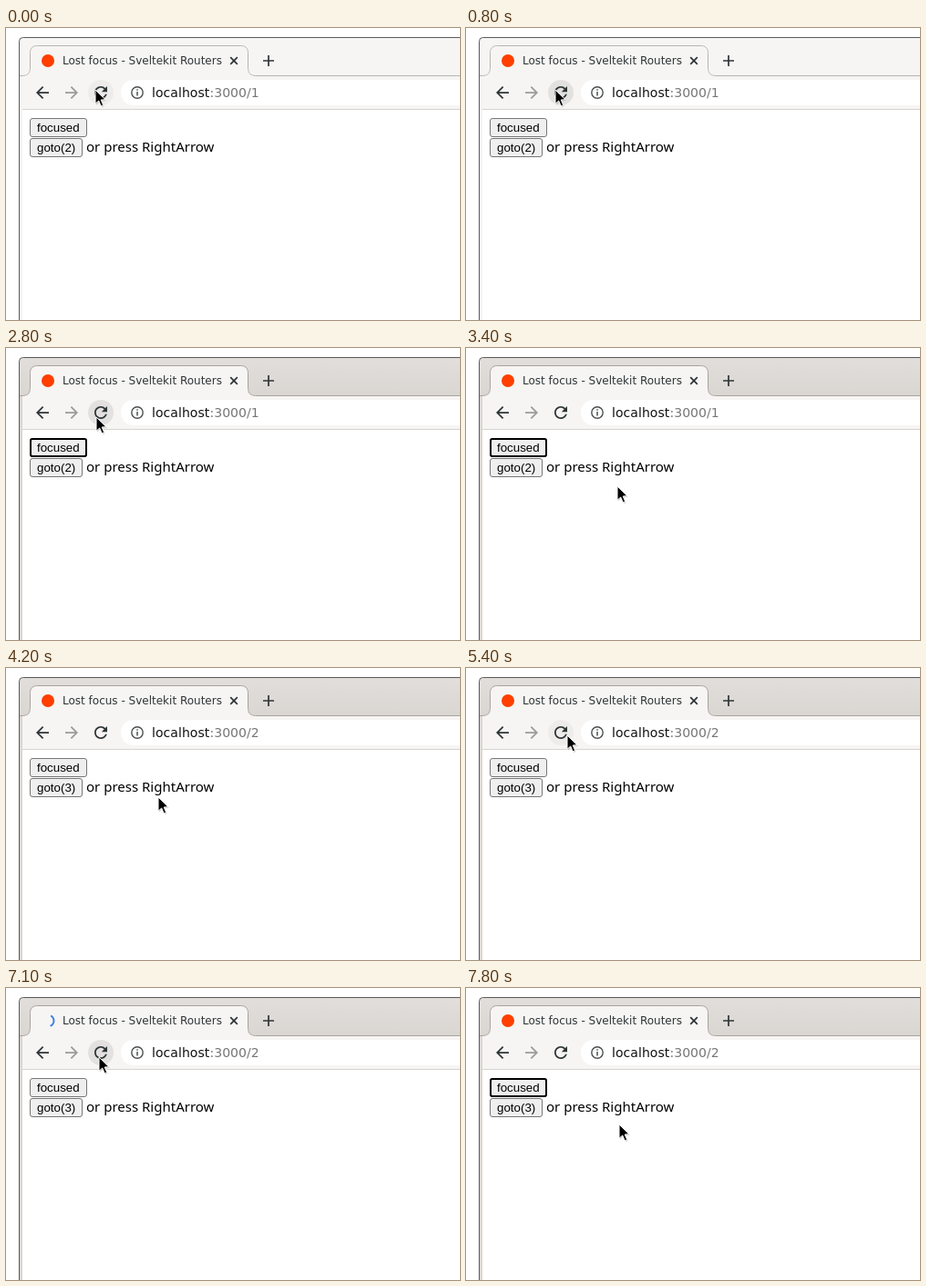
These frames come from a looping animation (498x321 px, 8 s). An HTML page:

```html
<!DOCTYPE html>
<html lang="en">
<head>
<meta charset="utf-8">
<title>Browser focus</title>
<style>
  html, body { margin: 0; width: 100%; height: 100%; overflow: hidden; background: #fff; }
  svg { display: block; width: 498px; height: 321px; }
  .ui { font: 12px "DejaVu Sans", sans-serif; fill: #2e3436; }
  .url { font-size: 14px; letter-spacing: .06px; fill: #111; }
  .dim { fill: #777; }
  .btn { font: 13.333px "Liberation Sans", Arial, sans-serif; }
  .body { font: 15px "Noto Sans", sans-serif; }
  .box { fill: #efefef; stroke: #767676; }
  .line { fill: none; stroke: #2e3436; stroke-width: 1.7; }
</style>
</head>
<body>
<svg viewBox="0 0 498 321">
  <defs>
    <linearGradient id="active" x1="0" y1="0" x2="0" y2="1">
      <stop offset="0" stop-color="#e1dedb"/>
      <stop offset="1" stop-color="#dad6d2"/>
    </linearGradient>
    <path id="arrow" d="M20 11H7.83l5.59-5.59L12 4l-8 8 8 8 1.41-1.41L7.83 13H20z"/>
  </defs>

  <!-- window frame -->
  <path id="strip" d="M15 50H18V321H15Z"/>
  <path id="bar" d="M15 52V14Q15 11 18 11H498V52Z"/>
  <path d="M14.5 321V14.5Q14.5 10.5 18.5 10.5H498" fill="none" stroke="#5a5a5a"/>
  <path d="M18 52H498V89H18Z" fill="#f6f5f4"/>
  <path d="M18 89H498V90H18Z" fill="#d8d4d0"/>
  <path d="M18 90H498V321H18Z" fill="#fff"/>
  <path id="tab" d="M15 52.5H18.5Q26.5 52.5 26.5 44.5V27.5Q26.5 19.5 34.5 19.5H257.5Q265.5 19.5 265.5 27.5V44.5Q265.5 52.5 273.5 52.5H498" fill="none"/>
  <path d="M20 53Q27 52 27 44.5V27.5Q27 20 34.5 20H257.5Q265 20 265 27.5V44.5Q265 52 272 53Z" fill="#f6f5f4"/>

  <!-- tab strip -->
  <circle id="icon" cx="46" cy="36" r="7" fill="#ff3e00"/>
  <circle id="spin" cx="46" cy="36" r="6.5" fill="none" stroke="#3b82e6" stroke-width="2" stroke-dasharray="14 27"/>
  <text class="ui" x="62" y="40">Lost focus - Sveltekit Routers</text>
  <path class="line" d="M246.2 32.2l7.6 7.6m0-7.6l-7.6 7.6"/>
  <path class="line" d="M282 36H294M288 30V42" stroke-width="2"/>

  <!-- toolbar -->
  <circle id="hover" cx="104" cy="71" r="14"/>
  <use href="#arrow" transform="translate(29.5 60.5) scale(.875)" fill="#2e3436"/>
  <use href="#arrow" transform="translate(82.5 60.5) scale(-.875 .875)" fill="#9b9b9a"/>
  <path transform="translate(93.5 60.5) scale(.875)" fill="#2e3436" d="M17.65 6.35C16.2 4.9 14.21 4 12 4c-4.42 0-7.99 3.58-7.99 8s3.57 8 7.99 8c3.73 0 6.84-2.55 7.73-6h-2.08c-.82 2.33-3.04 4-5.65 4-3.31 0-6-2.69-6-6s2.69-6 6-6c1.66 0 3.14.69 4.22 1.78L13 11h7V4z"/>
  <path d="M498 57H140A14 14 0 0 0 140 85H498Z" fill="#fff"/>
  <circle cx="144" cy="71" r="6.2" fill="none" stroke="#4b4f51" stroke-width="1.4"/>
  <path d="M144 70V74.4M144 67.2V68.7" stroke="#4b4f51" stroke-width="1.5"/>
  <text class="ui url" x="160" y="76">localhost<tspan class="dim">:3000/<tspan id="page"></tspan></tspan></text>

  <!-- page -->
  <rect class="box" x="26.5" y="99.5" width="62" height="20" rx="2.5"/>
  <rect id="focus" x="27" y="100" width="61" height="19" rx="2" fill="none" stroke="#000" stroke-width="2"/>
  <text class="btn" x="34" y="114">focused</text>
  <rect class="box" x="26.5" y="121.5" width="57" height="20" rx="2.5"/>
  <text id="goto" class="btn" x="34" y="136"></text>
  <text class="body" x="88" y="136">or press RightArrow</text>

  <g id="tip">
    <rect width="114" height="34" rx="5" fill="#333"/>
    <text class="ui" x="6.5" y="21" style="fill:#fff">Reload this page</text>
  </g>
  <g id="cursor">
    <path d="M1 1.5V16.5L4.6 13.2 7.2 19 9.6 18 7 12.3 12 12Z" opacity=".18"/>
    <path d="M0 0V15.3L3.7 12 6.2 17.8 8.7 16.7 6.2 11 11 10.7Z" stroke="#fff"/>
  </g>
</svg>
<script>
const LOOP = 8000, STEP = 100;
const el = {};
document.querySelectorAll('[id]').forEach(n => el[n.id] = n);

// pointer path: time, x, y
const path = [
  [0, 98, 68], [2700, 98, 68], [2800, 99, 76], [3200, 150, 138], [3400, 166, 152],
  [3600, 167, 144], [3700, 167, 142], [4900, 167, 142], [5400, 111, 74], [5900, 111, 74],
  [6000, 107, 82], [6300, 90, 105], [6700, 102, 76], [7200, 102, 76],
  [7300, 106, 82], [7700, 154, 125], [7800, 168, 150], [8000, 168, 150]
];
const within = (t, a, b) => t >= a && t < b;
const set = (n, attrs) => { for (const k in attrs) n.setAttribute(k, attrs[k]); };
const show = (n, on) => set(n, { visibility: on ? 'visible' : 'hidden' });
const move = (n, x, y) => set(n, { transform: `translate(${x} ${y})` });

function pointer(t) {
  const i = path.findIndex(k => k[0] > t);
  const [t0, x0, y0] = path[i - 1], [t1, x1, y1] = path[i];
  const p = (t - t0) / (t1 - t0);
  return [Math.round(x0 + (x1 - x0) * p), Math.round(y0 + (y1 - y0) * p)];
}

function shade(t) {
  if (within(t, 800, 2900) || within(t, 6900, 7300)) return .08;
  if (t < 800 || within(t, 5400, 6000) || within(t, 6600, 6900)) return .035;
  return 0;
}

function draw(ms) {
  const t = Math.floor(ms / STEP) * STEP;
  const active = t >= 900;
  const loading = within(t, 1000, 1200) || within(t, 7000, 7200);
  set(el.bar, { fill: active ? 'url(#active)' : '#f6f5f4' });
  set(el.strip, { fill: active ? '#dad6d2' : '#f6f5f4' });
  set(el.tab, { stroke: active ? '#aaa39c' : '#b8b3ad' });
  set(el.hover, { opacity: shade(t) });

  show(el.icon, !loading);
  show(el.spin, loading);
  set(el.spin, { transform: `rotate(${t * .6} 46 36)` });

  el.page.textContent = t < 4000 ? 1 : 2;
  el.goto.textContent = `goto(${t < 4200 ? 2 : 3})`;
  show(el.focus, within(t, 1200, 4200) || t >= 7200);

  const late = t >= 5900;
  show(el.tip, within(t, 500, 800) || within(t, 5900, 6000));
  move(el.tip, late ? 124 : 105, late ? 97 : 82);
  move(el.cursor, ...pointer(t));
}

const start = performance.now();
function tick() {
  draw((performance.now() - start) % LOOP);
  requestAnimationFrame(tick);
}
tick();
</script>
</body>
</html>
```
